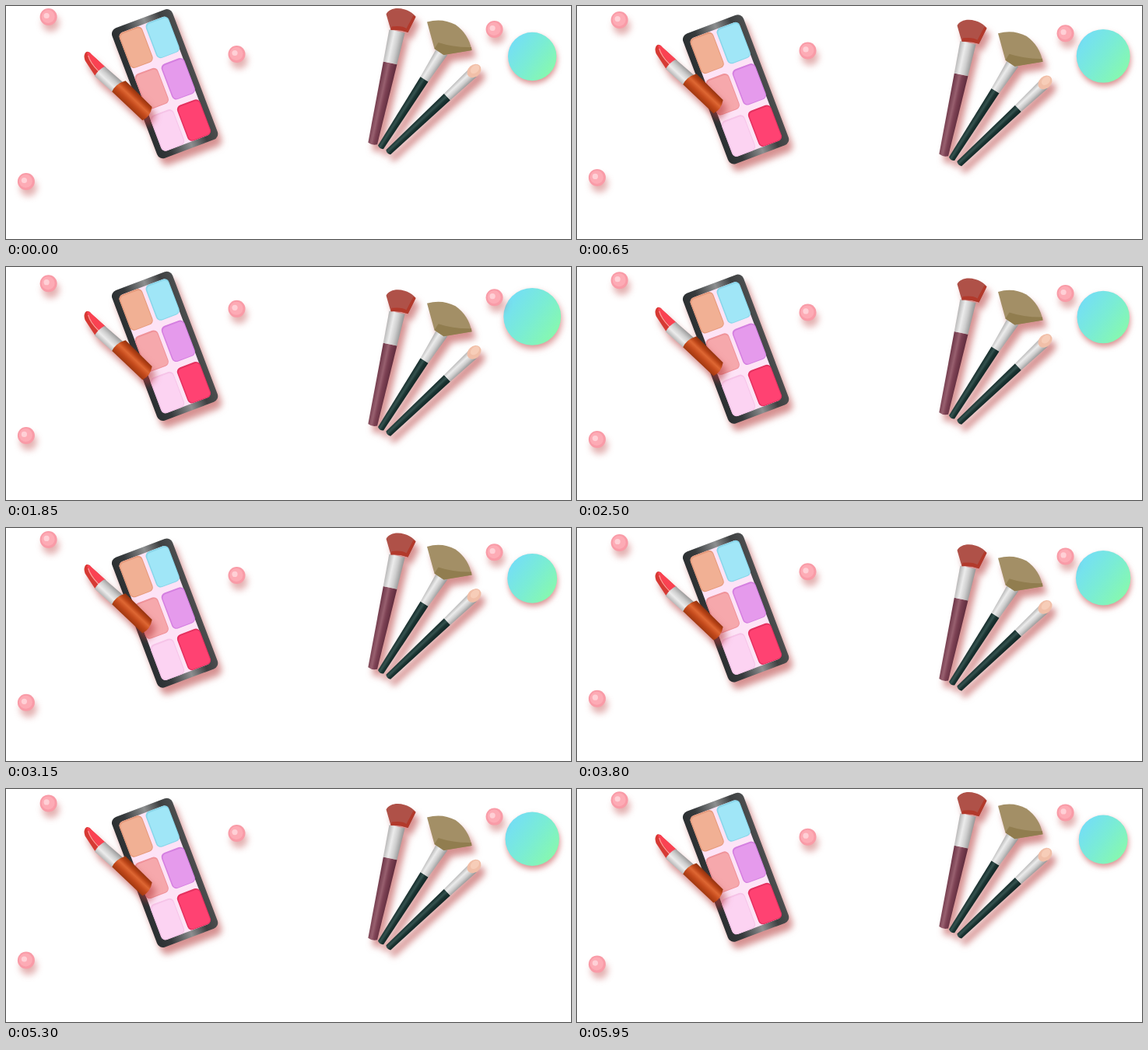
Recreate the animation shown at these times as an HTML page. Size 726 by 300 pixels, loop 6 s.

```html
<!DOCTYPE html>
<html lang="en">
<head>
<meta charset="utf-8">
<title>Floating cosmetics</title>
<style>
  html, body { margin: 0; width: 100%; height: 100%; overflow: hidden; background: #fff; }
  svg { display: block; width: 726px; height: 300px; }
  .float { filter: drop-shadow(5px 9px 4.5px rgba(180, 55, 55, .55)); }
  .pearl { filter: drop-shadow(3px 8px 4px rgba(190, 70, 70, .42)); }
  .disc { filter: drop-shadow(1px 4px 3.5px rgba(190, 60, 60, .55)); }
</style>
</head>
<body>
<svg viewBox="0 0 726 300">
  <defs>
    <linearGradient id="frame">
      <stop offset="0" stop-color="#2b3032"/><stop offset=".22" stop-color="#363a3c"/>
      <stop offset=".55" stop-color="#8d8f90"/><stop offset=".8" stop-color="#3e4041"/>
      <stop offset="1" stop-color="#4c4e4f"/>
    </linearGradient>
    <linearGradient id="silver">
      <stop offset="0" stop-color="#b4b4b4"/><stop offset=".35" stop-color="#ececec"/>
      <stop offset=".65" stop-color="#cdcdcd"/><stop offset="1" stop-color="#969696"/>
    </linearGradient>
    <linearGradient id="copper">
      <stop offset="0" stop-color="#a0380f"/><stop offset=".3" stop-color="#c44a1c"/>
      <stop offset=".55" stop-color="#de6733"/><stop offset=".75" stop-color="#bc4518"/>
      <stop offset="1" stop-color="#8e300c"/>
    </linearGradient>
    <linearGradient id="plum">
      <stop offset="0" stop-color="#6b3446"/><stop offset=".4" stop-color="#98606f"/>
      <stop offset=".6" stop-color="#7d4254"/><stop offset="1" stop-color="#5e2b3c"/>
    </linearGradient>
    <linearGradient id="teal">
      <stop offset="0" stop-color="#142a29"/><stop offset=".4" stop-color="#35524f"/>
      <stop offset=".65" stop-color="#1a3331"/><stop offset="1" stop-color="#122625"/>
    </linearGradient>
    <linearGradient id="mint" x1=".1" y1=".2" x2=".9" y2=".8">
      <stop offset="0" stop-color="#74dff4"/><stop offset=".5" stop-color="#7aecd5"/>
      <stop offset="1" stop-color="#86f8b0"/>
    </linearGradient>
  </defs>

  <g id="palette" class="float">
    <g id="tray" transform="translate(203.5 100.2) rotate(-20.7)">
      <rect x="-41.5" y="-89.500" width="83" height="179" rx="8" fill="url(#frame)"/>
      <rect x="-33.500" y="-81.500" width="67" height="163" rx="6" fill="#fde3f6"/>
    </g>
  </g>

  <g id="lipstick" class="float">
    <g transform="translate(103 59) rotate(-46.5)">
      <path d="M-15 30L-9.500 6.500Q-7 2 -5 1Q-2 -1 0 0Q3 2 2 7L2.500 32Z" fill="#d63a34"/>
      <path d="M-7 30L-4.500 11Q-3 4 0 1Q3 3 2 8L2.500 32Z" fill="#fa4252"/>
      <path d="M-7.500 29Q-7 13 -2 5" fill="none" stroke="#ff9a98" stroke-width="1.300"/>
      <path d="M-15.500 29Q-6 27 2.500 30L4 64H-14.500Z" fill="url(#silver)"/>
      <path d="M-14.500 59Q-4 55.500 7.500 62L6.500 110Q-4 117 -14.500 113Z" fill="url(#copper)"/>
    </g>
  </g>

  <g id="brushes" class="float">
    <g id="sticks"></g>
    <path d="M488 10.500C493 0 514 0 526 13.500L516 34Q505 30 494 31Z" fill="#af5148"/>
    <path d="M494 31L495 26.500Q509 25 514 29L523 12L526 14L516 34Q505 30 494 31Z" fill="#b2392b"/>
    <path d="M540.500 20.500Q560 15 577 24Q594 36 598 57L562 63L550 55Z" fill="#a38f66"/>
    <path d="M550 55L555 47Q575 53.500 597.500 53L598 57L562 63Z" fill="#917d4f"/>
    <ellipse cx="601" cy="83.500" rx="10" ry="7.700" transform="rotate(-43 601 83.500)" fill="#f1bfa8"/>
    <ellipse cx="602" cy="81.500" rx="6.500" ry="4.500" transform="rotate(-43 602 81.500)" fill="#f7cdb8"/>
  </g>

  <g id="disc" class="disc"><circle r="31.200" fill="url(#mint)"/></g>
  <g id="pearls"></g>
</svg>
<script>
  const LOOP = 6000, STEP = 50;
  const byId = id => document.getElementById(id);

  function add(parent, tag, attrs) {
    const el = document.createElementNS('http://www.w3.org/2000/svg', tag);
    for (const key in attrs) el.setAttribute(key, attrs[key]);
    return parent.appendChild(el);
  }

  // Palette pans: rim colour, fill colour
  [
    ['#e69a7b', '#f1b094'], ['#88d6ea', '#a0e6f7'],
    ['#ef9299', '#f6a8ac'], ['#d47fe0', '#e59aec'],
    ['#f6c4e8', '#fcd3f2'], ['#e4305f', '#ff4272']
  ].forEach(([rim, fill], i) => {
    const x = (i % 2 ? 18.4 : -18) - 15.75, y = (Math.floor(i / 2) - 1) * 57 - 24.5;
    add(byId('tray'), 'rect', { x, y, width: 31.5, height: 49, rx: 6, fill: rim });
    add(byId('tray'), 'rect', { x: x + 1.5, y: y + 2, width: 29, height: 46, rx: 5, fill });
  });

  // Brush sticks: foot x, foot y, tilt, joint, ferrule top, half widths, handle paint
  [
    [470.5, 178, 12.2, 107, 149, [6, 9, 10.3], 'plum'],
    [480.5, 182.7, 32.6, 105, 147, [4.2, 5.9, 8.2], 'teal'],
    [490, 189, 46.7, 105, 150, [4.2, 5.8, 7.2], 'teal']
  ].forEach(([x, y, tilt, joint, top, [a, b, c], paint]) => {
    const g = add(byId('sticks'), 'g', { transform: `translate(${x} ${y}) rotate(${tilt})` });
    add(g, 'path', { d: `M${-a} -1Q0 2 ${a} -1L${b} ${-joint}H${-b}Z`, fill: `url(#${paint})` });
    add(g, 'path', { d: `M${-b} ${-joint}H${b}L${c} ${-top}H${-c}Z`, fill: 'url(#silver)' });
  });

  // Pearls: x, y, travel
  const pearls = [[54.6, 14, 9.4], [296.5, 62, -10.6], [25.9, 226, -11.8], [627.6, 30, 12]].map(([x, y, dy]) => {
    const el = add(byId('pearls'), 'g', { class: 'pearl' });
    add(el, 'circle', { r: 11, fill: '#f99ba7' });
    add(el, 'circle', { cx: -.5, cy: -.5, r: 8.5, fill: '#fdabb5' });
    add(el, 'circle', { cx: -2.5, cy: -1.5, r: 3.6, fill: '#ffd0d6' });
    return { el, x, y, dy, half: 1500 };
  });

  const movers = [
    ...pearls,
    { el: byId('palette'), x: .6, y: 0, dy: 11, half: 1000 },
    { el: byId('lipstick'), x: .4, y: 0, dy: -14, half: 1000 },
    { el: byId('brushes'), x: .5, y: 0, dy: 34.3, half: 1500 },
    { el: byId('disc'), x: 676.2, y: 65, dy: -1.5, half: 1500, grow: .24 }
  ];

  // Linear there-and-back, 0 to 1 to 0
  const pingPong = (t, half) => 1 - Math.abs(t % (2 * half) / half - 1);

  function draw(t) {
    for (const { el, x, y, dy, half, grow = 0 } of movers) {
      const p = pingPong(t, half);
      el.setAttribute('transform', `translate(${x} ${y + dy * p}) scale(${1 + grow * p})`);
    }
  }

  const start = performance.now();
  function tick() {
    const t = (performance.now() - start) % LOOP;
    draw(Math.floor(t / STEP) * STEP);
    requestAnimationFrame(tick);
  }
  tick();
</script>
</body>
</html>
```
